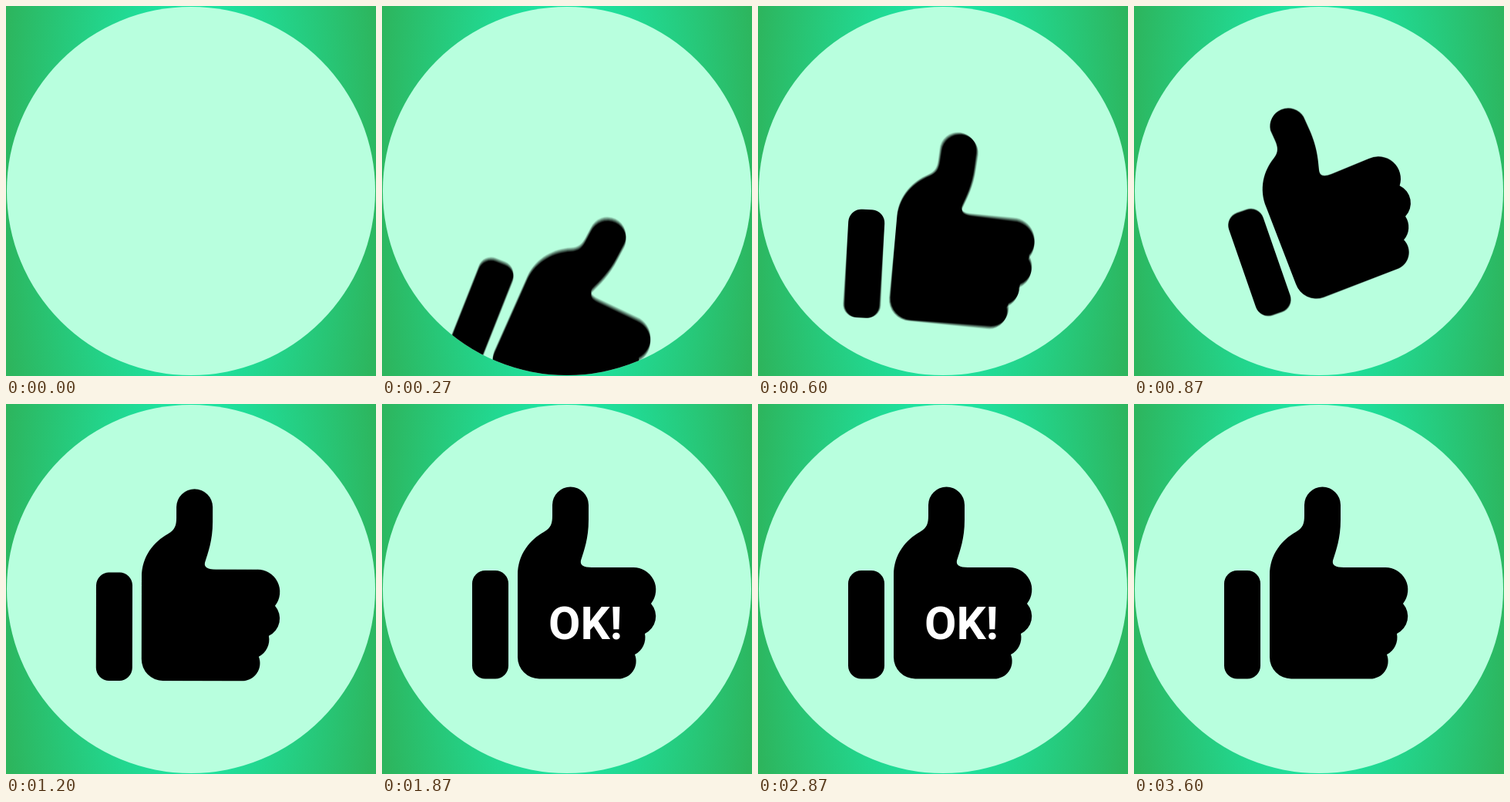
Write an HTML page with a canvas that moves like this. It is 480 by 480 pixels and loops after 3.67 s.

```html
<!DOCTYPE html>
<html lang="en">
<head>
<meta charset="utf-8">
<title>OK!</title>
<style>
  html, body { margin: 0; width: 100%; height: 100%; overflow: hidden; }
  body { background: radial-gradient(ellipse 250px 750px at 240px 220px, #1ce9aa 20%, #2db55d); }
  canvas { display: block; width: 480px; height: 480px; background: #b8ffde; clip-path: circle(239px); }
</style>
</head>
<body>
<canvas id="stage" width="480" height="480"></canvas>
<script>
const ctx = document.getElementById('stage').getContext('2d');
const LOOP = 3670, STEP = 66.7, SHUTTER = 16, SAMPLES = 16;
const PIVOT = { x: 235, y: 234 }, HEEL = { x: 176, y: 356 };

// Smooth 0 to 1 between two times
function ease(t, from, to) {
  const u = Math.min(1, Math.max(0, (t - from) / (to - from)));
  return u * u * (3 - 2 * u);
}

// Swing from 1 towards -1, then settle at 0; a higher power lags behind
const swing = (t, power) =>
  Math.cos(Math.PI * (Math.max(0, t) / 890) ** power) * (1 - ease(t, 760, 1220));

const tilt = t => 22.5 * Math.PI / 180 * swing(t, 2);
const bend = t => 0.066 * swing(t, 4);
const rise = t => 291 * Math.max(0, 1 - t / 1735) ** 4 + 120 * (1 - ease(t, 0, 200));
const textSize = t => ease(t, 1200, 1470) - ease(t, 3130, 3400);

function handPath(amount) {
  // Points turn about the heel of the hand, further out more strongly
  const p = (x, y) => {
    const dx = x - HEEL.x, dy = y - HEEL.y;
    const a = amount * Math.hypot(dx, dy) / 257, c = Math.cos(a), s = Math.sin(a);
    return `${HEEL.x + dx * c - dy * s} ${HEEL.y + dx * s + dy * c} `;
  };
  const knuckle = (r, x, y) => `A${r} ${r} 0 0 1 ${p(x, y)}`;
  const path = new Path2D(
    `M${p(176, 222)}C${p(176, 195)}${p(192, 176)}${p(210, 166)}
     C${p(219, 161)}${p(221, 155)}${p(221, 145)}L${p(221, 131)}
     ${knuckle(23.5, 268, 131)}L${p(268, 150)}
     C${p(268, 175)}${p(262, 190)}${p(258, 203)}Q${p(256, 212)}${p(272, 212)}
     L${p(325, 212)}${knuckle(29, 349, 259)}${knuckle(25, 341, 298)}
     ${knuckle(25, 328, 325)}${knuckle(23, 306, 356.5)}
     L${p(204, 356.5)}${knuckle(28, 176, 328.5)}Z`);
  path.roundRect(117, 216, 47, 140.5, 17);
  return path;
}

function drawHand(t) {
  ctx.save();
  ctx.translate(PIVOT.x, PIVOT.y + rise(t));
  ctx.rotate(tilt(t));
  ctx.translate(-PIVOT.x, -PIVOT.y);
  ctx.fill(handPath(bend(t)));
  ctx.restore();
}

// Motion blur: add up faint copies across the shutter time
function drawBlurredHand(t) {
  ctx.save();
  ctx.globalCompositeOperation = 'lighter';
  ctx.globalAlpha = 1 / SAMPLES;
  for (let i = 0; i < SAMPLES; i++) drawHand(t + ((i + 0.5) / SAMPLES - 0.5) * SHUTTER);
  ctx.restore();
}

function drawText(size) {
  if (size <= 0) return;
  ctx.save();
  ctx.translate(264, 283);
  ctx.scale(size, size);
  ctx.font = '700 60px Roboto, sans-serif';
  ctx.textAlign = 'center';
  ctx.fillStyle = '#fff';
  ctx.fillText('OK!', 0, 22);
  ctx.restore();
}

function draw(t) {
  ctx.clearRect(0, 0, 480, 480);
  ctx.fillStyle = '#000';
  (t < 1300 ? drawBlurredHand : drawHand)(t);
  drawText(textSize(t));
}

function tick() {
  const t = performance.now() % LOOP;
  draw(Math.floor((t + 4) / STEP) * STEP % LOOP);
  requestAnimationFrame(tick);
}
tick();
</script>
</body>
</html>
```
